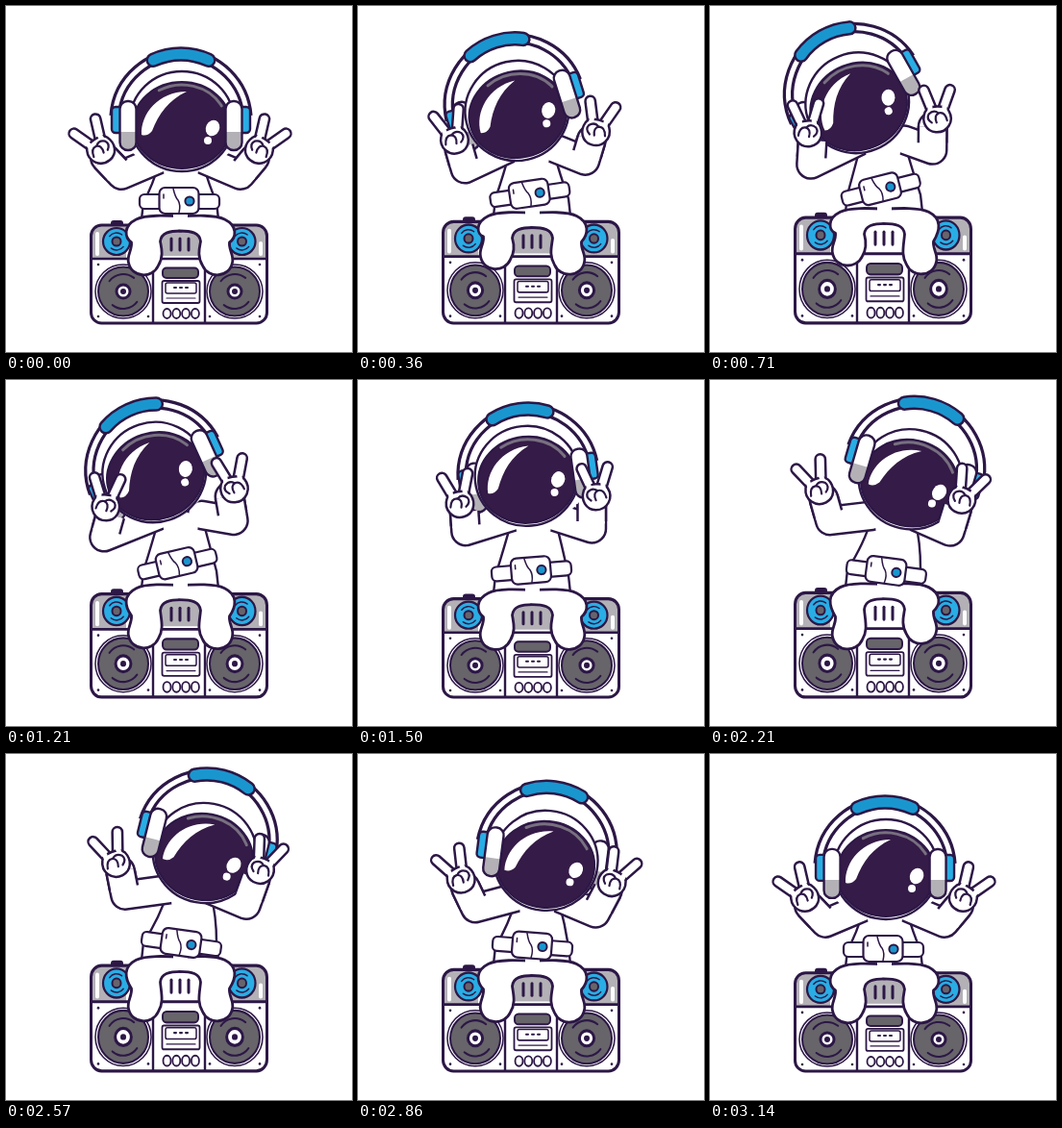
An HTML page with a canvas that plays this animation: 360x360 px, repeating every 3210 ms.

```html
<!DOCTYPE html>
<html lang="en">
<head>
<meta charset="utf-8">
<title>Dancing astronaut</title>
<style>
html, body { margin: 0; width: 100%; height: 100%; overflow: hidden; background: #fff; }
canvas { display: block; width: 360px; height: 360px; }
</style>
</head>
<body>
<canvas id="stage"></canvas>
<script>
const canvas = document.getElementById('stage');
const dpr = window.devicePixelRatio || 1;
canvas.width = canvas.height = 360 * dpr;
const c = canvas.getContext('2d');

const LOOP = 3210, STEPS = 45, TAU = Math.PI * 2;
const INK = '#2c1746', GLASS = '#351b47', BLUE = '#1a96cf', SKY = '#29ade4';
const GRAY = '#b3b1b6', COAL = '#67646a', WHITE = '#fff';

// Pose tracks; the rest pose is held again just before the loop closes.
const TIMES = [0, 710, 1210, 1790, 2210, 2570, 3140];
const TRACKS = {
  headX: [182, 149, 159, 197, 214, 209],
  headY: [119, 90, 95, 101, 91, 90],
  tilt: [0, -31, -22, 7, 17, 14],
  visorX: [183, 153, 158, 196, 209, 206],
  visorY: [124, 103, 100, 108, 107, 107],
  lHandX: [98, 102, 104, 108, 114, 114],
  lHandY: [149, 130, 131, 123, 113, 113],
  lTurn: [-34, -2, 3, -24, -22, -22],
  lElbowX: [120, 104, 103, 122, 125, 124],
  lElbowY: [176, 164, 163, 151, 146, 147],
  rHandX: [264, 235, 239, 258, 263, 265],
  rHandY: [149, 114, 113, 127, 123, 120],
  rTurn: [34, -4, -10, 6, 27, 23],
  rElbowX: [244, 231, 238, 248, 250, 250],
  rElbowY: [176, 148, 147, 162, 157, 157],
  chestX: [182, 180, 182, 184, 191, 190],
  chestY: [176, 155, 158, 160, 158, 158],
  bagX: [180, 177, 178, 182, 183, 182],
  bagY: [203, 190, 192, 204, 198, 197],
  bagTilt: [0, -15, -12, 3, 8, 8],
  lFoot: [0, -10, 0, 0, 0, -2],
  rFoot: [0, -1, 0, 0, -6, -2]
};

function sample(track, t) {
  const n = TIMES.length;
  const at = i => LOOP * Math.floor(i / n) + TIMES[(i + n) % n];
  const val = i => track[((i + n) % n) % track.length];
  const slope = i => (val(i + 1) - val(i - 1)) / (at(i + 1) - at(i - 1));
  let i = n - 1;
  while (TIMES[i] > t) i--;
  const d = at(i + 1) - at(i), u = (t - at(i)) / d, v = 1 - u;
  return v * v * (1 + 2 * u) * val(i) + u * u * (3 - 2 * u) * val(i + 1)
    + d * u * v * (v * slope(i) - u * slope(i + 1));
}

function paint(fill, line = 2.6) {
  if (fill) { c.fillStyle = fill; c.fill(); }
  if (line) { c.strokeStyle = INK; c.lineWidth = line; c.stroke(); }
}
function shape(d, fill, line) {
  const p = new Path2D(d);
  if (fill) { c.fillStyle = fill; c.fill(p); }
  if (line) { c.strokeStyle = INK; c.lineWidth = line; c.stroke(p); }
}
function oval(x, y, rx, ry, fill, line) {
  c.beginPath(); c.ellipse(x, y, rx, ry, 0, 0, TAU); paint(fill, line);
}
function box(x, y, w, h, r, fill, line) {
  c.beginPath(); c.roundRect(x, y, w, h, r); paint(fill, line);
}
function line(x1, y1, x2, y2, w, color = INK) {
  c.beginPath(); c.moveTo(x1, y1); c.lineTo(x2, y2);
  c.strokeStyle = color; c.lineWidth = w; c.stroke();
}
function place(x, y, deg, draw, flip = 1) {
  c.save();
  c.translate(x, y); c.rotate(deg * Math.PI / 180); c.scale(flip, 1);
  draw();
  c.restore();
}

function speaker(x, beat) {
  oval(x, 297, 29, 28, WHITE, 1.5);
  oval(x, 297, 26, 25.5, COAL, 2);
  for (const a of [-2.5, 0.65]) {
    c.beginPath(); c.arc(x, 297, 18, a, a + 1.6); paint(null, 2);
  }
  const r = 7 + beat * 1.5;
  oval(x, 297, r, r, WHITE, 3);
  oval(x, 297, 3, 3, INK, 0);
}

function tweeter(x) {
  oval(x, 245, 14, 14, SKY, 2.2);
  for (const a of [-2.5, 0.65]) {
    c.beginPath(); c.arc(x, 245, 9, a, a + 1.6); paint(null, 1.4);
  }
  oval(x, 245, 4.5, 4.5, COAL, 2);
}

function boombox(stretch, beat) {
  c.save();
  c.translate(0, 331); c.scale(1, stretch); c.translate(0, -331);
  box(109, 223, 13, 10, 3, INK, 0);
  box(88.5, 228, 183, 102, 11, WHITE, 0);
  c.save();
  c.beginPath(); c.roundRect(88.5, 228, 183, 102, 11); c.clip();
  c.fillStyle = GRAY;
  c.fillRect(88, 228, 37, 35);
  c.fillRect(235, 228, 37, 35);
  line(95, 258, 95, 237, 4, WHITE);
  line(265, 258, 265, 247, 4, WHITE);
  c.fillStyle = beat > 0.7 ? WHITE : GRAY;
  c.fillRect(154, 228, 55, 32);
  c.restore();
  tweeter(115);
  tweeter(245.5);
  for (const x of [172, 181, 190]) line(x, 242, x, 254, 3);
  line(89, 263, 271, 263, 2.6);
  for (const x of [153, 207]) line(x, 263, x, 329, 2.4);
  for (const x of [96, 148, 212, 264])
    for (const y of [269, 323]) oval(x, y, 1.3, 1.3, INK, 0);
  speaker(122, beat);
  speaker(238, beat);
  box(163, 272.5, 37, 10.5, 4, COAL, 2);
  box(162.5, 286, 39, 23, 2, WHITE, 1.8);
  box(166, 288, 32, 11, 2, WHITE, 1.5);
  for (const x of [175, 181, 187]) line(x, 293, x + 2, 293, 2);
  line(167, 304, 197, 304, 1.2);
  for (let i = 0; i < 4; i++) oval(167.5 + i * 9.8, 320, 4, 5, WHITE, 1.8);
  box(88.5, 228, 183, 102, 11, null, 3);
  c.restore();
}

function leg(x, lift, foot, flip) {
  const k = -lift, f = foot;
  place(x, 0, 0, () => shape(
    `M4 ${219 + k} C-16 ${218 + k} -36 ${217 + k} -46 ${222 + k}
     C-60 ${229 + k} -58 ${241 + k} -51 ${246 + f}
     C-50 ${254 + f} -56 ${259 + f} -54 ${267 + f}
     C-51 ${283 + f} -29 ${284 + f} -23 ${270 + f}
     C-17 ${260 + f} -20 ${251 + f} -21 ${245 + k}
     C-20 ${236 + k} -12 ${234 + k} 1 ${234 + k}`, WHITE, 2.8), flip);
}

function torso(p, lift) {
  const { chestX: x, chestY: y } = p, hip = 222 - lift;
  shape(`M${x - 23} ${y - 12} Q${x - 29} ${y + 10} 143 ${hip - 18} L141 ${hip}
    L221 ${hip} L219 ${hip - 18} Q${x + 29} ${y + 10} ${x + 23} ${y - 12} Z`, WHITE, 2.4);
}

function bag(p) {
  place(p.bagX, p.bagY, p.bagTilt, () => {
    box(-41, -7, 83, 15, 5, WHITE, 2.2);
    box(-20.5, -14, 41, 27, 6, WHITE, 2.2);
    shape('M-6 -13 Q-4 -4 -1 -1 Q2 4 0 12', null, 1.5);
    oval(11, 0, 4.6, 4.6, BLUE, 2);
    line(-16, -7, -16, -3, 1.5);
  });
}

// Outlined tube; the white core may run further than the outline.
function limb(points, cap, end = points) {
  c.lineCap = cap;
  for (const [w, color, path] of [[32, INK, points], [27, WHITE, end]]) {
    c.beginPath();
    path.forEach(([x, y]) => c.lineTo(x, y));
    c.strokeStyle = color; c.lineWidth = w; c.stroke();
  }
  c.lineCap = 'round';
}

const wrist = (p, s) => [p[s + 'HandX'] + (s === 'l' ? 5 : -5), p[s + 'HandY'] + 9];

function arm(p, s, side) {
  limb([wrist(p, s), [p[s + 'ElbowX'], p[s + 'ElbowY']], [p.chestX + side * 22, p.chestY - 17]], 'round');
}

function forearm(p, s) {
  const [x, y] = wrist(p, s);
  const dx = p[s + 'ElbowX'] - x, dy = p[s + 'ElbowY'] - y;
  const upTo = u => [[x, y], [x + dx * u, y + dy * u]];
  limb(upTo(0.7), 'butt', upTo(0.8));
}

function hand(p, s, flip) {
  place(p[s + 'HandX'], p[s + 'HandY'], p[s + 'Turn'], () => {
    for (const side of [-1, 1])
      place(side * 2.5, 0, side * 21, () => box(-5.2, -36, 10.4, 36, 5.2, WHITE, 2.5));
    shape('M-12 -7 C-9 -13 9 -14 13 -6 C17 4 12 14 2 15 C-10 16 -18 4 -12 -7 Z', WHITE, 2.5);
    c.fillStyle = WHITE;
    c.fillRect(-10, -13, 5, 6);
    c.fillRect(5, -13, 5, 6);
    shape('M-10 3 Q-8 -6 -2 -5 Q4 -3 1 5 M-1 -5 Q4 -9 9 -4 Q12 1 6 5', null, 2.2);
  }, flip);
}

function band() {
  const up = -Math.PI / 2;
  const arc = (half, w, color) => {
    c.beginPath(); c.arc(0, 0, 69, up - half, up + half);
    c.strokeStyle = color; c.lineWidth = w; c.stroke();
  };
  c.lineCap = 'butt';
  arc(1.5, 11.5, INK);
  arc(1.5, 5, WHITE);
  c.lineCap = 'round';
  arc(0.43, 15.5, INK);
  arc(0.43, 10.5, BLUE);
}

function cup(side) {
  c.save();
  c.scale(side, 1);
  box(60, -14, 12, 27, 4, SKY, 2.4);
  box(46.5, -20, 17, 51, 8, WHITE, 0);
  c.save();
  c.beginPath(); c.roundRect(46.5, -20, 17, 51, 8); c.clip();
  c.fillStyle = GRAY; c.fillRect(46, 12, 18, 20);
  c.restore();
  box(46.5, -20, 17, 51, 8, null, 2.4);
  c.restore();
}

function visor() {
  oval(0, 0, 51, 45, GLASS, 2);
  c.beginPath(); c.ellipse(0, 0, 47, 42, 0, -2.1, -0.5);
  c.strokeStyle = '#777080'; c.lineWidth = 3; c.stroke();
  shape('M-42 10 C-43 -12 -24 -35 5 -35 C-14 -26 -24 -12 -31 6 Q-36 12 -42 10 Z', WHITE, 0);
  place(32, 3, 25, () => oval(0, 0, 7, 8.5, WHITE, 0));
  oval(27, 16, 4, 4, WHITE, 0);
}

function head(p) {
  const far = p.tilt < -4 ? -1 : p.tilt > 4 ? 1 : 0;
  const inFrame = draw => place(p.headX, p.headY, p.tilt, draw);
  inFrame(() => {
    oval(0, 0, 66, 52, WHITE, 0);
    band();
    if (far) cup(far);
  });
  place(p.visorX, p.visorY, p.tilt * 0.75, () => {
    oval(0, -4, 54, 52, WHITE, 2.4);
    visor();
  });
  inFrame(() => {
    for (const side of [-1, 1]) if (side !== far) cup(side);
  });
}

function render(t) {
  const p = {};
  for (const k in TRACKS) p[k] = sample(TRACKS[k], t);
  const beat = Math.sin(TAU * t / LOOP) ** 2;
  const stretch = 1 + 0.085 * beat, lift = 100 * (stretch - 1);

  c.setTransform(dpr, 0, 0, dpr, 0, 0);
  c.fillStyle = WHITE;
  c.fillRect(0, 0, 360, 360);
  c.lineCap = c.lineJoin = 'round';

  boombox(stretch, beat);
  torso(p, lift);
  arm(p, 'l', -1);
  arm(p, 'r', 1);
  // cover the arm ends inside the chest
  oval(p.chestX, p.chestY - 5, 18, 16, WHITE, 0);
  leg(181.5, lift, p.lFoot, 1);
  leg(181.5, lift, p.rFoot, -1);
  c.fillStyle = WHITE;
  c.fillRect(174, 212 - lift, 15, 20);
  bag(p);
  head(p);
  forearm(p, 'l');
  forearm(p, 'r');
  hand(p, 'l', 1);
  hand(p, 'r', -1);
}

const start = performance.now();
function tick() {
  const t = (performance.now() - start) % LOOP;
  render(Math.floor(t / LOOP * STEPS) * LOOP / STEPS);
  requestAnimationFrame(tick);
}
tick();
</script>
</body>
</html>
```
